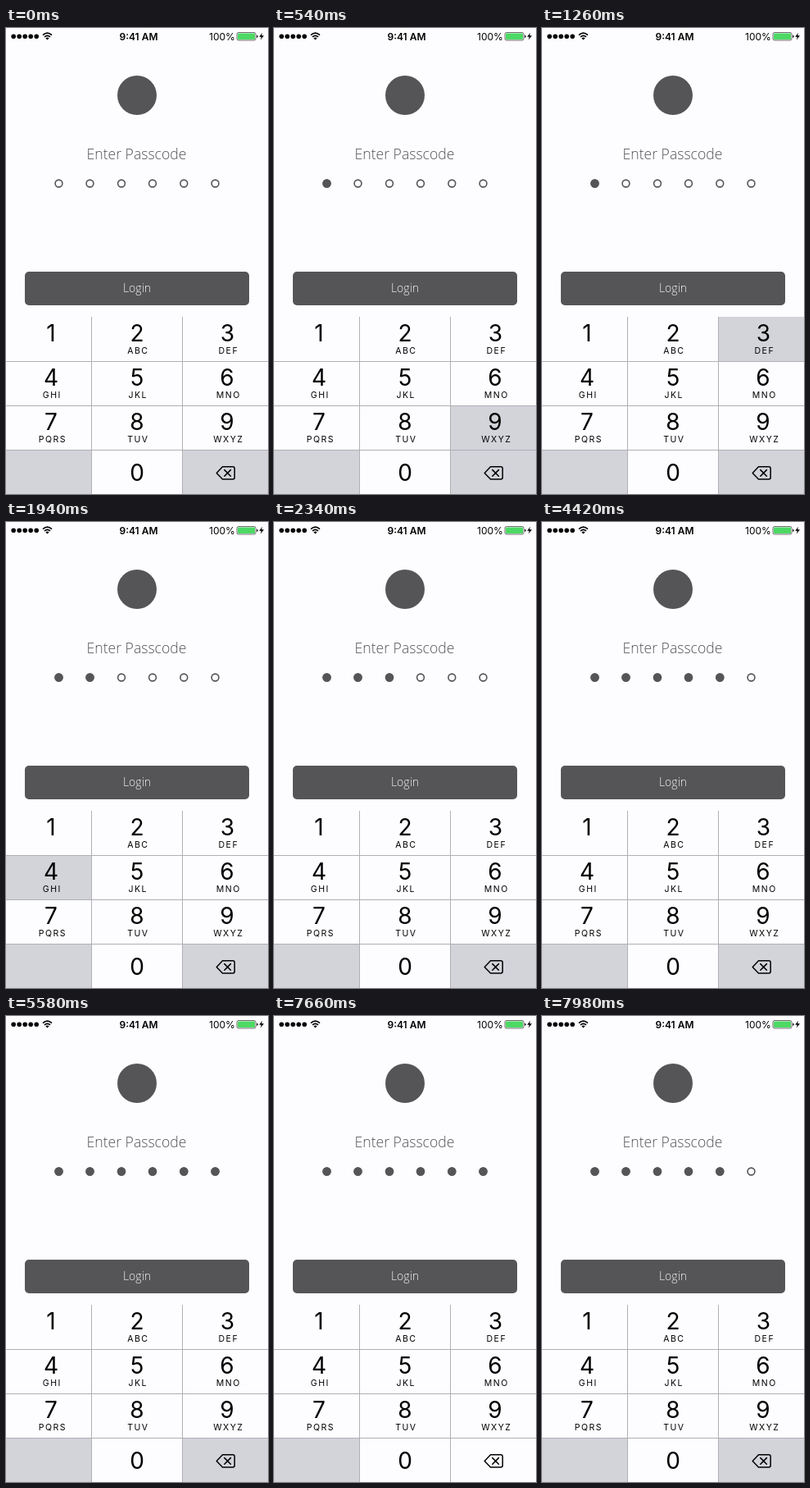
Write an HTML page that moves like this. It is 320 px wide and 568 px high and loops after 8 s.

```html
<!DOCTYPE html>
<html lang="en">
<head>
<meta charset="utf-8">
<title>Passcode login</title>
<style>
  html, body { margin: 0; width: 100%; height: 100%; overflow: hidden; background: #fdfcfe; }
  svg { display: block; width: 320px; height: 568px; }
  text { text-anchor: middle; font-family: Inter, "Liberation Sans", sans-serif; }
  .status { font-size: 12px; font-weight: 400; }
  .clock { font-weight: 600; }
  .label { font-family: "Open Sans", "Noto Sans", sans-serif; font-weight: 300; }
  .digit { font-size: 28px; }
  .letters { font-size: 10.5px; letter-spacing: 1.5px; }
  .ink { fill: #555457; }
  .ring { fill: none; stroke: #555457; stroke-width: 1.6; }
  .grey { fill: #d2d4da; }
  .rule { fill: #b0b0b4; }

  .on { opacity: 0; animation: 8s step-end infinite; }
  .dot1 { animation-name: dot1; }
  .dot2 { animation-name: dot2; }
  .dot3 { animation-name: dot3; }
  .dot4 { animation-name: dot4; }
  .dot5 { animation-name: dot5; }
  .dot6 { animation-name: dot6; }
  .key3 { animation-name: key3; }
  .key4 { animation-name: key4; }
  .key7 { animation-name: key7; }
  .key8 { animation-name: key8; }
  .key9 { animation-name: key9; }
  .del { fill: #fdfcfe; animation-name: del; }

  @keyframes dot1 { 0% { opacity: 0 } 6.75%, 100% { opacity: 1 } }
  @keyframes dot2 { 0% { opacity: 0 } 18.75%, 100% { opacity: 1 } }
  @keyframes dot3 { 0% { opacity: 0 } 27.25%, 100% { opacity: 1 } }
  @keyframes dot4 { 0% { opacity: 0 } 46.75%, 100% { opacity: 1 } }
  @keyframes dot5 { 0% { opacity: 0 } 53.75%, 100% { opacity: 1 } }
  @keyframes dot6 { 0% { opacity: 0 } 67.25% { opacity: 1 } 96.75%, 100% { opacity: 0 } }

  @keyframes key9 { 0% { opacity: 0 } 6.25% { opacity: 1 } 8.75%, 100% { opacity: 0 } }
  @keyframes key3 {
    0% { opacity: 0 } 15.75% { opacity: 1 } 20.25% { opacity: 0 }
    51.25% { opacity: 1 } 55.25%, 100% { opacity: 0 }
  }
  @keyframes key4 { 0% { opacity: 0 } 24.25% { opacity: 1 } 29.25%, 100% { opacity: 0 } }
  @keyframes key8 { 0% { opacity: 0 } 45.25% { opacity: 1 } 48.75%, 100% { opacity: 0 } }
  @keyframes key7 { 0% { opacity: 0 } 66.25% { opacity: 1 } 69.75%, 100% { opacity: 0 } }
  @keyframes del { 0% { opacity: 0 } 95.75% { opacity: 1 } 99.75%, 100% { opacity: 0 } }
</style>
</head>
<body>
<svg viewBox="0 0 320 568">
  <rect width="320" height="568" fill="#fdfcfe"/>

  <!-- status bar -->
  <g>
    <circle cx="9.2" cy="10.3" r="2.8"/>
    <circle cx="16.2" cy="10.3" r="2.8"/>
    <circle cx="23.2" cy="10.3" r="2.8"/>
    <circle cx="30.2" cy="10.3" r="2.8"/>
    <circle cx="37.2" cy="10.3" r="2.8"/>
    <path d="M45 8.6Q50.5 3.6 56 8.6M47 10.9Q50.5 7.8 54 10.9" fill="none" stroke="#000" stroke-width="1.6"/>
    <path d="M48.4 12.4Q50.5 10.8 52.6 12.4L50.5 14.6Z"/>
    <text class="status clock" x="162" y="14.5">9:41 AM</text>
    <text class="status" x="264" y="14.5">100%</text>
    <rect x="282" y="5.5" width="23" height="9.5" rx="2" fill="none" stroke="#333" stroke-width=".7"/>
    <rect x="283" y="6.5" width="21" height="7.5" rx="1" fill="#4cd964"/>
    <path d="M306 8.5Q307.8 9 307.8 10.2T306 12Z" fill="#333"/>
    <path d="M313 5.8L309.2 10.8H311.8L310.8 14.6L315 9.3H312.2Z"/>
  </g>

  <circle class="ink" cx="160" cy="82" r="24"/>
  <text class="label ink" x="159.5" y="159.5" font-size="17.6">Enter Passcode</text>

  <!-- passcode dots -->
  <g class="ring">
    <circle cx="64.5" cy="189.5" r="4.4"/>
    <circle cx="102.5" cy="189.5" r="4.4"/>
    <circle cx="141" cy="189.5" r="4.4"/>
    <circle cx="179" cy="189.5" r="4.4"/>
    <circle cx="217.3" cy="189.5" r="4.4"/>
    <circle cx="255.5" cy="189.5" r="4.4"/>
  </g>
  <g class="ink">
    <circle class="on dot1" cx="64.5" cy="189.5" r="5.2"/>
    <circle class="on dot2" cx="102.5" cy="189.5" r="5.2"/>
    <circle class="on dot3" cx="141" cy="189.5" r="5.2"/>
    <circle class="on dot4" cx="179" cy="189.5" r="5.2"/>
    <circle class="on dot5" cx="217.3" cy="189.5" r="5.2"/>
    <circle class="on dot6" cx="255.5" cy="189.5" r="5.2"/>
  </g>

  <rect class="ink" x="23" y="297" width="274" height="41" rx="5"/>
  <text class="label" x="160" y="322.3" font-size="14" fill="#f4f3f5">Login</text>

  <!-- keypad -->
  <g class="grey">
    <rect y="514" width="105" height="54"/>
    <rect x="215" y="514" width="105" height="54"/>
    <rect class="on key3" x="215" y="352" width="105" height="54"/>
    <rect class="on key4" y="406" width="105" height="54"/>
    <rect class="on key7" y="460" width="105" height="54"/>
    <rect class="on key8" x="105" y="460" width="110" height="54"/>
    <rect class="on key9" x="215" y="460" width="105" height="54"/>
  </g>
  <rect class="on del" x="215" y="514" width="105" height="54"/>
  <g class="rule">
    <rect x="104" y="352" width="1" height="216"/>
    <rect x="215" y="352" width="1" height="216"/>
    <rect y="406" width="320" height="1"/>
    <rect y="460" width="320" height="1"/>
    <rect y="514" width="320" height="1"/>
  </g>
  <g class="digit">
    <text x="55" y="382">1</text>
    <text x="160" y="382">2</text>
    <text x="270.5" y="382">3</text>
    <text x="55" y="436">4</text>
    <text x="160" y="436">5</text>
    <text x="270" y="436">6</text>
    <text x="55" y="490">7</text>
    <text x="160" y="490">8</text>
    <text x="270" y="490">9</text>
    <text x="160" y="551.5">0</text>
  </g>
  <g class="letters">
    <text x="161.3" y="397">ABC</text>
    <text x="271.8" y="397">DEF</text>
    <text x="56.3" y="451">GHI</text>
    <text x="161.3" y="451">JKL</text>
    <text x="271.8" y="451">MNO</text>
    <text x="56.8" y="505">PQRS</text>
    <text x="161.3" y="505">TUV</text>
    <text x="271.8" y="505">WXYZ</text>
  </g>
  <path d="M264.5 534.8H277Q279.2 534.8 279.2 537V547.8Q279.2 550 277 550H264.5L257.2 542.4ZM266.8 538.6L274.4 546.2M274.4 538.6L266.8 546.2"
    fill="none" stroke="#000" stroke-width="1.5" stroke-linejoin="round" stroke-linecap="round"/>
</svg>
</body>
</html>
```
